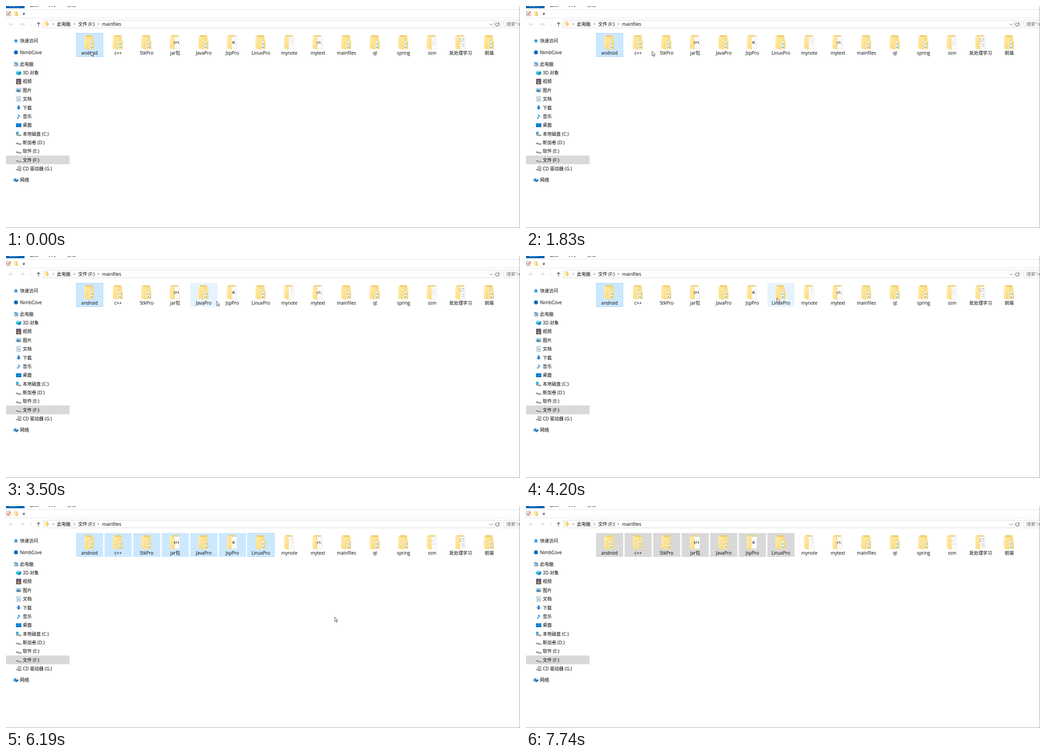
Write an HTML page that moves like this. It is 1137 by 493 pixels and loops after 7.84 s.

```html
<!DOCTYPE html>
<html lang="zh">
<head>
<meta charset="utf-8">
<style>
  html, body { margin: 0; height: 100%; overflow: hidden; background: #fff; }
  svg { display: block; }
  text { font: 10px "Open Sans", "Noto Sans CJK SC", "Noto Sans CJK", sans-serif; fill: #000; white-space: pre; }
  .line { fill: none; stroke: #555; }
  .pale { stroke: #c4c4c4; }
</style>
</head>
<body>
<svg id="stage" width="1137" height="493" viewBox="0 0 1137 493">
  <defs>
    <linearGradient id="flap" x2="1" y2="1">
      <stop stop-color="#ffeeb5"/><stop offset="1" stop-color="#fbd976"/>
    </linearGradient>
    <g id="back"><path d="M3 0H19V30H3Z" fill="#f0cd69"/></g>
    <g id="front"><path d="M0 1.500L9.500 4.500Q10.500 5 10.500 6V32L1 29.500Q0 29 0 28Z" fill="url(#flap)"/></g>
    <g id="files">
      <use href="#back"/>
      <path d="M9 4H18V29H9Z" fill="#fff"/>
      <path d="M11 3.500H20.500V30.500H11Z" fill="#f9df8d"/>
      <path d="M14 14H18.500V29H14Z" fill="#eef4f3"/>
      <path d="M14.500 18H18V20.500H14.500ZM14.500 25H18V28H14.500Z" fill="#86bfd9"/>
      <path d="M18.500 13H22V30.500H18.500Z" fill="#f6d778"/>
      <use href="#front"/>
    </g>
    <g id="paper">
      <use href="#back"/>
      <path d="M5 3H22V30H5Z" fill="#fafafa" stroke="#dedede" stroke-width=".6"/>
      <use href="#front"/>
    </g>
    <g id="mini"><path d="M-4-5H3V5H-4Z" fill="#f2c95c"/><path d="M-4-5L1-4V5.500L-4 4.500Z" fill="#ffe59a"/><path d="M3-1H4V5H3Z" fill="#e5b84a"/></g>
    <g id="drive"><path d="M-6 1L-2.500-1L6 2L4 3.500Z" fill="#d9d9d9"/><path d="M-6 1L4 3.500L6 2V4L4 5.500L-6 2.700Z" fill="#6c6c6c"/><path d="M2.500 4H4" stroke="#dff3df"/></g>
    <g id="star"><path d="M0-5L1.500-1.700L5-1.500L2.300 1L3.300 4.700L0 2.700L-3.300 4.700L-2.300 1L-5-1.500L-1.500-1.700Z" fill="#2b93dc"/></g>
    <g id="disc"><circle r="4.500" fill="#0a6cc0"/></g>
    <g id="pc"><path d="M-4-4.500L4-3L5 3L-2 1.500Z" fill="#5aaee4" stroke="#8b9aa5" stroke-width=".7"/><path d="M-5 2.500L0 4.500L5 4" class="line" stroke-width="1.200"/></g>
    <g id="cube"><path d="M-5.500-3L0-5.500L5.500-3L0-1Z" fill="#8de0f5"/><path d="M-5.500-3L0-1V5.500L-5.500 3Z" fill="#32b5dc"/><path d="M5.500-3L0-1V5.500L5.500 3Z" fill="#1588b5"/></g>
    <g id="film"><path d="M-5.500-6H5.500V6H-5.500Z" fill="#333"/><path d="M-2.800-4.500H2.800V-.5H-2.800Z" fill="#8b74c0"/><path d="M-2.800.5H2.800V4.500H-2.800Z" fill="#dca25a"/><path d="M-4.200-5V5M4.200-5V5" stroke="#ddd" stroke-dasharray="1"/></g>
    <g id="picture"><path d="M-5.500-4H5.500V4H-5.500Z" fill="#fff" stroke="#8c9aa4" stroke-width=".8"/><path d="M-4.200-3H4.200V3H-4.200Z" fill="#8dcbee"/><path d="M-4.200 0L-1-1L4.200 2V3H-4.200Z" fill="#276899"/></g>
    <g id="doc"><path d="M-4-5.500H4V5.500H-4Z" fill="#fff" stroke="#7d93a1" stroke-width=".9"/><path d="M-2.500-3H0M-2.500-1H2.500M-2.500 1H2.500M-2.500 3H2.500" stroke="#4c94c4" stroke-width=".9"/></g>
    <g id="down"><path d="M-2-5H2V-.5H5L0 5L-5-.5H-2Z" fill="#3280d0"/></g>
    <g id="note"><path d="M-1-5.500Q0-2 3.500-1Q4 1 2.500 2Q2-.5 0-1V3Q0 5-2 5Q-4 4.800-3.500 3Q-2.500 1.700-1 2Z" fill="#1187d6"/></g>
    <g id="desk"><path d="M-6-4H6V4.500H-6Z" fill="#0e86d9"/><path d="M-6 3H6V4.500H-6Z" fill="#075d9d"/></g>
    <g id="system"><use href="#drive"/><path d="M-5.500-4.500H-.5V.500H-5.500Z" fill="#18a1e0"/></g>
    <g id="cd"><use href="#drive"/><circle cx="2" cy="-2" r="3.900" fill="#bcbcbc" stroke="#888" stroke-width=".7"/><circle cx="2" cy="-2" r="1" fill="#fff"/></g>
    <g id="net"><path d="M-5.500-2L1-5V2L-5.500 3Z" fill="#4897d0"/><path d="M-2 1L5.500-2V2L0 5Z" fill="#2377b7"/></g>
  </defs>

  <path d="M0 0H41V5H0Z" fill="#0763b4"/>
  <path class="line" d="M0 7.500H1137M0 26.500H1137" style="stroke:#e6e6e6"/>
  <text x="8" y="1" style="fill:#fff">文件</text>
  <text x="52" y="1">主页</text><text x="94" y="1">共享</text><text x="135" y="1">查看</text>
  <path d="M1.500 12H10V21.500H1.500Z" fill="#fff" stroke="#a88b80"/>
  <path class="line" d="M3 16.500L5 19L9 13.500" style="stroke:#dc4a20" stroke-width="1.500"/>
  <use href="#mini" x="22" y="17"/>
  <path d="M37 15.500H42M37.300 17.300H41.700L39.500 19.700Z" fill="#222" stroke="#222" stroke-width=".6"/>

  <path class="line pale" d="M16 40.500H7M11 36.500L7 40.500L11 44.500M31 40.500H40M36 36.500L40 40.500L36 44.500M53 39.500L55 41.500L57 39.500"/>
  <path class="line" d="M72 45.500V36.500M68.500 40L72 36.500L75.500 40" stroke-width="1.200"/>
  <path class="line" d="M82.500 31.500H1094.500V48.500H82.500ZM1079.500 31.500V48.500M1140 31.500H1101.500V48.500H1140" style="stroke:#d9d9d9"/>
  <use href="#mini" x="90" y="39.500"/>
  <path class="line" d="M103 37.500L105.500 40L103 42.500M150 37.500L152.500 40L150 42.500M203 37.500L205.500 40L203 42.500M1069.500 39L1073 42.500L1076.500 39"/>
  <path class="line" d="M1089.500 38A3.900 3.900 0 1 1 1086 37M1090 35.500V38.500H1087" stroke-width="1.200"/>
  <text x="112.700" y="43.500">此电脑</text><text x="159.700" y="43.500">文件 (F:)</text><text x="212.500" y="43.500">mainfiles</text>
  <text x="1106.700" y="43.500" style="fill:#6d6d6d">搜索"mainfiles"</text>

  <path d="M0 332H140.500V351.500H0Z" fill="#d9d9d9"/>
  <g id="sidebar"></g>
  <g id="items"></g>
  <path class="line" d="M0 492.500H1137M1136.500 0V493" style="stroke:#a6a6a6"/>

  <g id="tip">
    <path d="M555.500 105.500H723.500V146.500H555.500Z" fill="#fff" stroke="#8a8a8a"/>
    <g style="opacity:.7">
      <text x="560" y="117">创建日期: 2018/7/16 10:25</text>
      <text x="560" y="130">大小: 12.6 MB</text>
      <text x="560" y="143">文件夹: bin, include, src, test</text>
    </g>
  </g>
  <path id="cursor" d="M.5.5V10.500L2.800 8.400L4.400 12.300L6 11.600L4.400 7.900H7.600Z" fill="#fff" stroke="#222" stroke-width=".8"/>
</svg>
<script>
const $ = id => document.getElementById(id);
const LOOP = 7840, PITCH = 63.15, LEFT = 155;

// icon, label, centre y, icon x
const places = [
  ["star", "快速访问", 77.300, 22], ["disc", "NimbCove", 103, 22], ["pc", "此电脑", 129, 22],
  ...[["cube", "3D 对象"], ["film", "视频"], ["picture", "图片"], ["doc", "文档"], ["down", "下载"],
    ["note", "音乐"], ["desk", "桌面"], ["system", "本地磁盘 (C:)"], ["drive", "新加卷 (D:)"],
    ["drive", "软件 (E:)"], ["drive", "文件 (F:)"], ["cd", "CD 驱动器 (G:)"]]
    .map(([icon, label], i) => [icon, label, 148.300 + 19.350 * i, 28]),
  ["net", "网络", 386.500, 22]
];
$("sidebar").innerHTML = places.map(([icon, label, y, x]) =>
  `<use href="#${icon}" x="${x}" y="${y}"/><text x="${x + 9}" y="${y + 3.800}">${label}</text>`).join("");

const names = ["android", "c++", "StkPro", "jar包", "JavaPro", "JspPro", "LinuxPro", "mynote",
  "mytext", "mainfiles", "qt", "spring", "ssm", "批处理学习", "前端"];
// marks on the sheets of folders that show a document
const sketches = {
  3: ["M9 14L11 19M11 13V20M13 15H16M14 13V19M17 14L19 19M19 13V18", "#333"],
  5: ["M12 14H17M12 16H17M12 18H17M13 14V18M16 14V18", "#333"],
  7: ["M13 6L17 9L14 14M18 8L20 14L17 19M15 23H19", "#d2d2d2"],
  8: ["M9 15L12 19M11 13V20M13 16L17 14M15 13V19M17 19L19 15", "#444"],
  12: ["M7 8L19 20M19 7L8 19M8 24L19 13M11 23L20 18", "#dadada"],
  13: ["M10 9L19 7L18 12L11 15ZM13 21Q19 16 19 22T14 24", "#999"]
};
const leftOf = i => LEFT + PITCH * i;

$("items").innerHTML = names.map((name, i) => {
  const [d, color] = sketches[i] || [];
  const sketch = d ? `<path d="${d}" fill="none" stroke="${color}" stroke-width=".8"/>` : "";
  return `<g transform="translate(${leftOf(i)} 60)">
    <rect class="cell" x=".5" y=".5" width="59" height="52"/>
    <g transform="translate(18 5)"><use href="#${d ? "paper" : "files"}"/>${sketch}</g>
    <text x="29.800" y="47.500" text-anchor="middle">${name}</text></g>`;
}).join("");
const cells = document.querySelectorAll(".cell");

// pointer path: time, x, y
const path = [
  [0, 188, 100], [430, 188, 100], [600, 225, 135], [800, 430, 180], [980, 640, 196], [1100, 721, 185],
  [1240, 687, 151], [1400, 600, 118], [1560, 440, 104], [1700, 325, 101], [1800, 279.300, 99.500],
  [1900, 279.300, 99.500], [2030, 283, 100], [2200, 310, 110], [2450, 360, 108], [2690, 405, 102],
  [2830, 448, 102], [2850, 449, 102], [3440, 449, 102], [3800, 552, 93], [4199, 552, 93],
  [4200, 555, 93], [5700, 555, 93], [6500, 836, 342], [6840, 1024, 494], [LOOP, 1024, 494]
];
function pointerAt(t) {
  const i = path.findIndex(p => p[0] > t);
  const [t0, x0, y0] = path[i - 1], [t1, x1, y1] = path[i];
  const k = (t - t0) / (t1 - t0);
  return [x0 + (x1 - x0) * k, y0 + (y1 - y0) * k];
}

function draw(t) {
  const [x, y] = pointerAt(t);
  $("cursor").setAttribute("transform", `translate(${Math.round(x) - .5} ${Math.round(y)})`);

  const last = t < 5360 ? 0 : 6, active = t < 7740;
  cells.forEach((cell, i) => {
    const dx = x - leftOf(i);
    const hover = dx >= 0 && dx < 61 && y >= 60 && y < 113;
    const fill = i <= last ? (active ? "#cce8ff" : "#d9d9d9") : hover ? "#e5f3ff" : "none";
    cell.setAttribute("fill", fill);
    cell.setAttribute("stroke", i === last && active ? "#a4d6ff" : fill);
  });

  const shown = t >= 4950 && t < 5360;
  $("tip").setAttribute("opacity", shown ? Math.min(1, (Math.floor((t - 4950) / 28) + 1) / 6) : 0);
}

const start = performance.now();
function frame() {
  draw((performance.now() - start) % LOOP);
  requestAnimationFrame(frame);
}
frame();
</script>
</body>
</html>
```
